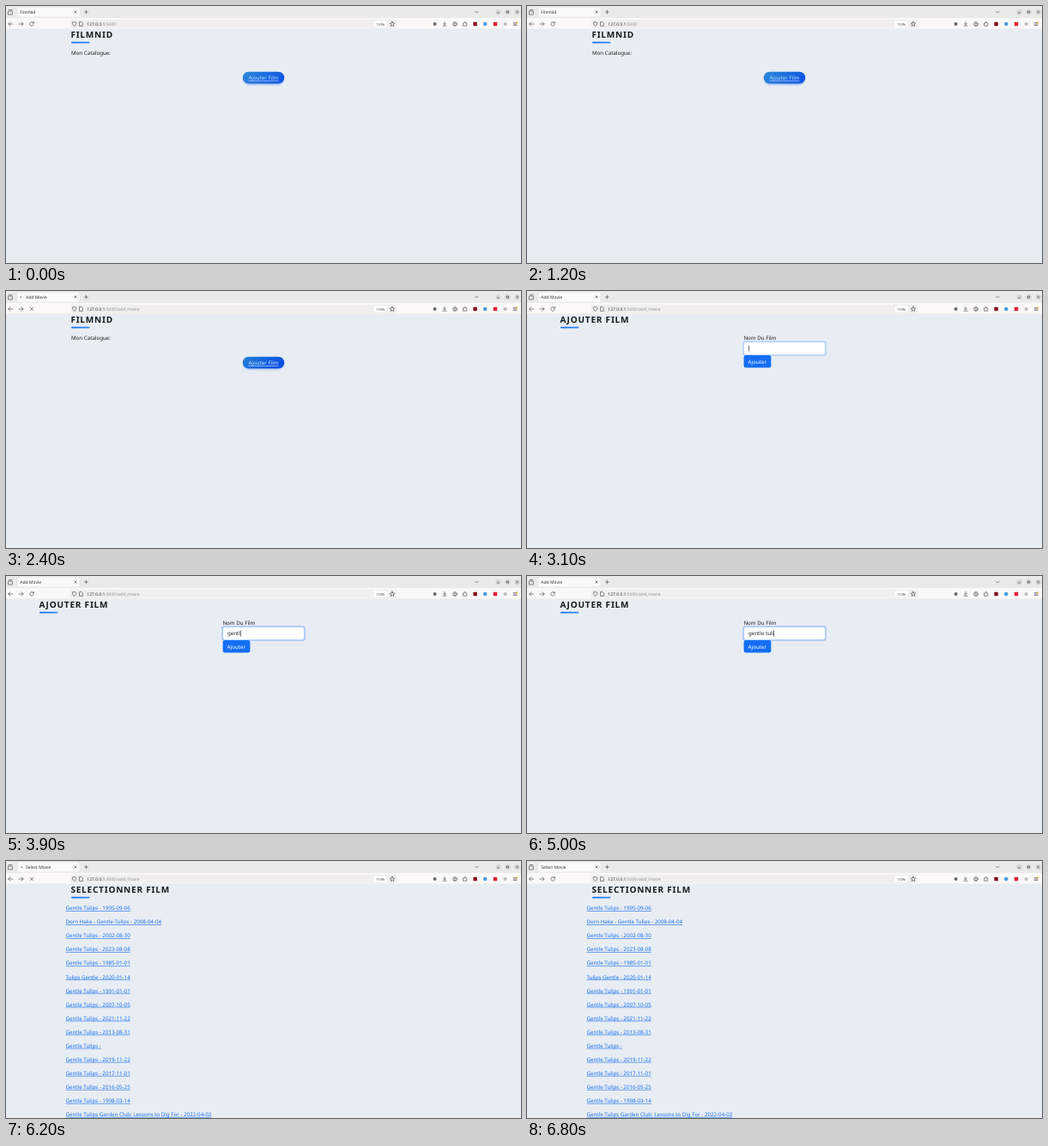
Recreate the animation shown at these times as an HTML page. Size 600 by 300 pixels, loop 8000 ms.

```html
<!DOCTYPE html>
<html lang="fr">
<head>
<meta charset="utf-8">
<title>FilmNid</title>
<style>
  html, body { margin: 0; width: 100%; height: 100%; overflow: hidden; background: #e8edf3; }
  svg { display: block; width: 600px; height: 300px; }
  text {
    font: 500 6.2px "Noto Sans", "Open Sans", sans-serif;
    fill: #1c2024; white-space: pre; text-rendering: geometricPrecision;
  }
  .ui { font-size: 5px; font-weight: 400; fill: #333336; }
  .dim { fill: #929294; }
  .zoom { font-size: 4px; fill: #333; }
  .head { font-size: 10px; font-weight: 700; letter-spacing: .8px; fill: #14181c; }
  .link { fill: #176fee; text-decoration: underline; text-decoration-thickness: .45px; }
  .light { fill: #fff; }
  .icon { fill: none; stroke: #4a4a4c; stroke-width: .65; stroke-linecap: round; stroke-linejoin: round; }
</style>
</head>
<body>
<svg id="stage" viewBox="0 0 600 300" xmlns="http://www.w3.org/2000/svg">
  <defs>
    <linearGradient id="bar"><stop stop-color="#146ef5"/><stop offset="1" stop-color="#2f8af0"/></linearGradient>
    <linearGradient id="pill" x1="0" y1="0" x2="1" y2=".3">
      <stop id="pillA" stop-color="#2f8bd8"/><stop id="pillB" offset="1" stop-color="#1059e4"/>
    </linearGradient>
    <filter id="blur" x="-20%" y="-50%" width="140%" height="220%"><feGaussianBlur stdDeviation="1.3"/></filter>
  </defs>
</svg>
<script>
const LOOP = 8000;
const NS = "http://www.w3.org/2000/svg";
const stage = document.getElementById("stage");

function add(parent, tag, attrs = {}, content) {
  const el = document.createElementNS(NS, tag);
  for (const k in attrs) el.setAttribute(k, attrs[k]);
  if (content !== undefined) el.textContent = content;
  parent.appendChild(el);
  return el;
}
const group = (parent = stage) => add(parent, "g");
const text = (p, x, y, s, cls = "", extra = {}) => add(p, "text", { x, y, class: cls, ...extra }, s);
const rect = (p, x, y, width, height, fill, rx = 0, extra = {}) =>
  add(p, "rect", { x, y, width, height, fill, rx, ...extra });
const dot = (p, cx, cy, r, fill) => add(p, "circle", { cx, cy, r, fill });
const icon = (p, d, extra = {}) => add(p, "path", { d, class: "icon", ...extra });
const show = (el, on) => el.setAttribute("visibility", on ? "inherit" : "hidden");

// Browser frame
const chrome = group();
rect(chrome, 0, 0, 600, 14, "#eaeae9");
rect(chrome, 0, 14, 600, 13, "#faf9f7");
rect(chrome, 0, 26.7, 600, .5, "#e0e0e0");
rect(chrome, 12.8, 1.3, 73.4, 11.8, "#d6d6d5", 1.8);
rect(chrome, 13.2, 1.6, 72.6, 11.2, "#fafaf9", 1.6);
rect(chrome, 75, 15.8, 380, 10, "#f0efee", 1.6);

icon(chrome, "M2.9 6h4.4v4h-4.4zM3.3 4.5h3.6");
icon(chrome, "M79.9 5.9l2.2 2.2M82.1 5.9l-2.2 2.2", { "stroke-width": .5 });
icon(chrome, "M91.5 7h3.8M93.4 5.1v3.8", { "stroke-width": .55 });
icon(chrome, "M546.6 6.2l1.8 1.8l1.8-1.8");
for (const x of [573.5, 584.5, 595.6]) dot(chrome, x, 7, 3.1, "#d5d5d4");
icon(chrome, "M572.4 8h2.2M583.5 6h2v2h-2zM594.6 6l2 2M596.6 6l-2 2", { "stroke-width": .5 });

icon(chrome, "M7.8 21h-5M4.9 18.8l-2.2 2.2l2.2 2.2");
icon(chrome, "M15 21h5M17.9 18.8l2.2 2.2l-2.2 2.2", { stroke: "#bcbcbb" });
const reloadIcon = icon(chrome, "M32 19.6a2.3 2.3 0 1 0 .3 2M32.4 18.3v1.7h-1.7");
const stopIcon = icon(chrome, "M28.3 19.2l3.4 3.4M31.7 19.2l-3.4 3.4");

icon(chrome, "M79.6 18.5l2.1.8c0 2-.5 3.4-2.1 4.3c-1.6-.9-2.1-2.3-2.1-4.3z", { "stroke-width": .55 });
icon(chrome, "M85.9 18.6h2.2l1.2 1.2v3.6h-3.4z", { "stroke-width": .55 });
text(chrome, 94.3, 22.8, "127.0.0.1", "ui");
const port = text(chrome, 115.4, 22.8, "", "ui dim");
rect(chrome, 428.6, 17.4, 15, 7, "#fff", 1);
text(chrome, 436.1, 22.5, "110%", "zoom", { "text-anchor": "middle" });
icon(chrome, "M450 18.2l.8 1.8l2 .2l-1.5 1.3l.5 2l-1.8-1l-1.8 1l.5-2l-1.5-1.3l2-.2z", { "stroke-width": .55 });

dot(chrome, 499.6, 21, 2, "#6a6a6c");
icon(chrome, "M511 18.5v3.3M509.6 20.4l1.4 1.4l1.4-1.4M508.9 23.2h4.2");
add(chrome, "circle", { cx: 523, cy: 21, r: 2.4, class: "icon" });
dot(chrome, 523, 20.3, .8, "#4a4a4c");
icon(chrome, "M521.6 22.5q1.4-1.4 2.8 0");
icon(chrome, "M533 20h1.1v-.8a.7.7 0 0 1 1.4 0v.8h1.3v3.2h-3.8z");
rect(chrome, 544.4, 18.7, 4.4, 4.6, "#800f1c", .6);
dot(chrome, 558.2, 21, 2.3, "#4c9be0");
rect(chrome, 567.8, 18.7, 4.4, 4.6, "#e02136", .6);
dot(chrome, 581.6, 21, 2.1, "#bdbdbd");
icon(chrome, "M591.2 19.6h3.8M591.2 21.1h3.8M591.2 22.6h3.8", { "stroke-width": .5 });
dot(chrome, 595, 19.3, 1.1, "#e5b53c");

const tabTitle = text(chrome, 16.3, 9, "", "ui");
const spinner = dot(chrome, 17, 7.2, .8, "#55555a");

// Pages
function page(x, title) {
  const g = group();
  text(g, x - .6, 37, title, "head");
  rect(g, x, 41.7, 21.5, 1.7, "url(#bar)", .85);
  return g;
}

const home = page(76, "FILMNID");
text(home, 76, 57.3, "Mon Catalogue:");
const shadow = rect(home, 276.5, 79, 47, 13, "#1c62d8", 6.5, { filter: "url(#blur)" });
rect(home, 275.7, 76.8, 48.6, 13.8, "url(#pill)", 6.9);
const pillText = text(home, 300, 86, "Ajouter Film", "link", { "text-anchor": "middle" });

const form = page(39, "AJOUTER FILM");
text(form, 252.4, 57.3, "Nom Du Film");
const glow = rect(form, 251, 58, 98, 18, "#0d6efd", 3.4);
const field = rect(form, 252.6, 59.6, 94.8, 14.8, "#fff", 2.4, { "stroke-width": .5 });
const typed = text(form, 258, 69.2, "");
const caret = rect(form, 258, 63.6, .6, 7, "#1c2024");
rect(form, 252.6, 74.9, 31.8, 14.7, "#136ef3", 2.4);
text(form, 257.6, 84.5, "Ajouter", "light");

const results = page(76, "SELECTIONNER FILM");
const NAME = "Gentle Tulips";
const rows = [
  "1995-09-06", ["Dorn Hake - " + NAME, "2008-04-04"], "2002-08-30", "2023-08-08",
  "1985-01-01", ["Tulips Gentle", "2020-01-14"], "1991-01-01", "2007-10-05",
  "2021-11-22", "2013-08-31", "", "2019-11-22", "2017-11-01", "2016-05-25", "1998-03-14",
  [NAME + " Garden Club: Lessons to Dig For", "2022-04-02"]
];
rows.forEach((row, i) => {
  const [name, date] = Array.isArray(row) ? row : [NAME, row];
  text(results, 69.5, 57.3 + i * 16.04, `${name} - ${date}`.trim(), "link");
});

// Timing
const QUERY = "gentle tulips";
const KEYS = [3400, 3500, 3600, 3700, 3900, 3950, 4000, 4700, 4800, 4900, 5000, 5100, 5200];
const FOCUS = 3000, SUBMIT = 5700;
const FORM_AT = 2600, RESULTS_AT = 6200;
const between = (t, a, b) => t >= a && t < b;
const ramp = (t, a, b) => {
  const u = Math.min(1, Math.max(0, (t - a) / (b - a)));
  return u * u * (3 - 2 * u);
};
const mix = (a, b, u) => `rgb(${a.map((v, i) => Math.round(v + (b[i] - v) * u))})`;

function setText(el, s) {
  if (el.textContent !== s) el.textContent = s;
}

function render(t) {
  const loading = between(t, 2100, 3000) || between(t, SUBMIT, 6500);
  show(spinner, loading);
  show(stopIcon, loading);
  show(reloadIcon, !loading);
  spinner.setAttribute("cx", 17 + 2.4 * Math.sin((t - 6100) / 1050 * Math.PI * 2));
  tabTitle.setAttribute("x", loading ? 23 : 16.3);
  setText(tabTitle, t < 2400 ? "FilmNid" : t < 6000 ? "Add Movie" : "Select Movie");
  setText(port, t < 2400 ? ":5000" : ":5000/add_movie");

  show(home, t < FORM_AT);
  show(form, between(t, FORM_AT, RESULTS_AT));
  show(results, t >= RESULTS_AT);

  const hover = ramp(t, 1300, 1700);
  document.getElementById("pillA").setAttribute("stop-color", mix([47, 139, 216], [34, 130, 216], hover));
  document.getElementById("pillB").setAttribute("stop-color", mix([16, 89, 228], [12, 78, 226], hover));
  shadow.setAttribute("opacity", .4 - .12 * hover);
  pillText.style.fill = mix([190, 220, 250], [208, 230, 253], hover);

  const focus = ramp(t, FOCUS, FOCUS + 150);
  glow.setAttribute("opacity", .25 * focus);
  field.setAttribute("stroke", mix([206, 212, 218], [134, 183, 254], focus));

  const count = KEYS.filter(k => k <= t).length;
  setText(typed, QUERY.slice(0, count));
  const since = t - (count ? KEYS[count - 1] : FOCUS);
  const caretOn = between(t, FOCUS, SUBMIT) && since % 1000 < 500;
  show(caret, caretOn);
  if (caretOn) caret.setAttribute("x", 258 + (count ? typed.getComputedTextLength() : 0));
}

function loop() {
  render(performance.now() % LOOP);
  requestAnimationFrame(loop);
}
loop();
</script>
</body>
</html>
```
